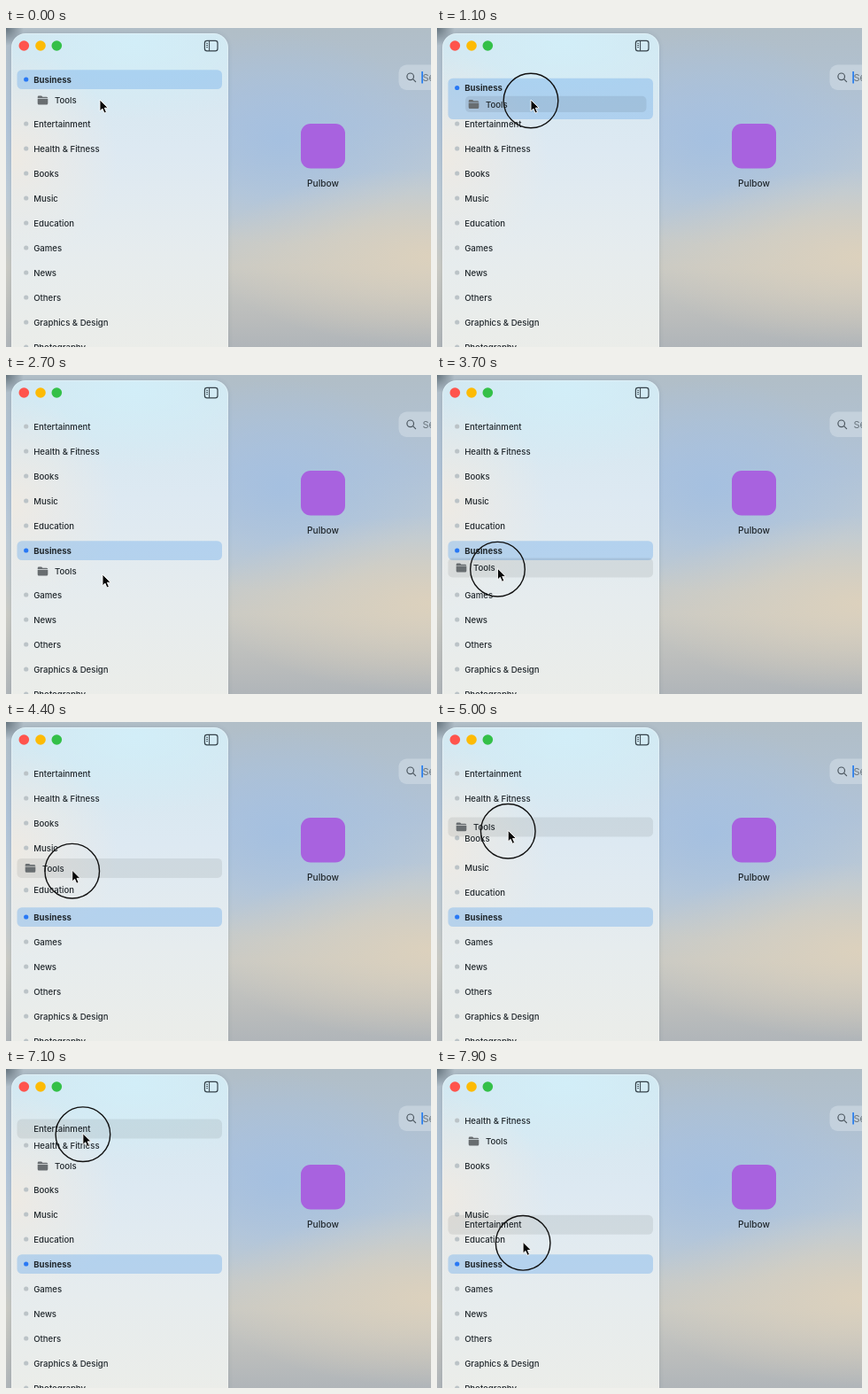
Recreate the animation shown at these times as an HTML page. Size 480 by 360 pixels, loop 8000 ms.

```html
<!DOCTYPE html>
<html lang="en">
<head>
<meta charset="utf-8">
<title>Sidebar reordering</title>
<style>
html, body { margin: 0; width: 100%; height: 100%; overflow: hidden; }
#stage {
  position: relative; width: 480px; height: 360px; overflow: hidden;
  background:
    radial-gradient(circle at 0 0, #55646ed0 0, #55646e00 20px),
    radial-gradient(ellipse 250px 100px at 480px 258px, #dcd1bd 0, #dcd1bd00 100%),
    radial-gradient(ellipse 170px 120px at 310px 125px, #a5c0e0 0, #a5c0e000 100%),
    linear-gradient(#b1bec7 0, #b0c3d8 30%, #bccad6 52%, #cacac4 75%, #bbbdbc 90%, #b0b5b9 100%);
}
#panel {
  position: absolute; left: 6px; top: 6px; width: 245px; height: 380px;
  border-radius: 16px;
  box-shadow: 0 0 5px #3c506428, inset 0 0 1px 1px #ffffff50;
  background:
    radial-gradient(ellipse 120px 120px at 0 140px, #eeeae3 0, #eeeae300 100%),
    radial-gradient(ellipse 170px 90px at 140px 10px, #d2eef8 0, #d2eef800 100%),
    linear-gradient(#d2e7f0 0, #dde9f2 35%, #e6ecee 65%, #ecede8 100%);
}
svg { position: absolute; left: 0; top: 0; }
text { font: 500 9.6px Inter, "Open Sans", sans-serif; fill: #20272c; }
</style>
</head>
<body>
<div id="stage">
  <div id="panel"></div>
  <svg width="480" height="360" viewBox="0 0 480 360">
    <circle cx="20.3" cy="20" r="5.8" fill="#ff544d"/>
    <circle cx="39" cy="20" r="5.8" fill="#fdbb05"/>
    <circle cx="57.3" cy="20" r="5.8" fill="#34c048"/>
    <g fill="none" stroke="#35424a" stroke-width="1.2">
      <rect x="224.4" y="14.4" width="14.6" height="11.4" rx="2.6"/>
      <path d="M229.6 14.4V25.8M226.2 17.3h1.8M226.2 19.5h1.8M226.2 21.7h1.8" stroke-width="1"/>
    </g>
    <rect x="443.5" y="41.5" width="60" height="28.5" rx="9" fill="#d0dce6" fill-opacity=".62"/>
    <g fill="none" stroke="#4b565f" stroke-width="1.2" stroke-linecap="round">
      <circle cx="456.7" cy="54.8" r="3.8"/><path d="M459.6 57.7l3 3"/>
    </g>
    <text x="470.5" y="59.9" style="font-size:11px;font-weight:400;fill:#69747d">Search</text>
    <rect id="caret" x="469.3" y="49" width="1.6" height="13.5" fill="#1f78f0"/>
    <rect x="333" y="108" width="50" height="50.5" rx="11" fill="#a862df"/>
    <text x="358" y="179" text-anchor="middle" style="font-size:10.2px">Pulbow</text>
    <g id="rows"></g>
    <circle id="ring" r="30.8" fill="none" stroke="#111" stroke-width="1.4"/>
    <path id="pointer" d="M0 0V12.8L2.9 10.1L5 15L7.4 14L5.3 9.2H9.2Z" fill="#080808" stroke="#fff" stroke-width=".9" stroke-linejoin="round"/>
  </svg>
</div>
<script>
const LOOP = 8000, STEP = 100;
const FIRST = 58, ROW = 28, CHILD = 22, CHILD_DROP = 23.5;
const $ = id => document.getElementById(id);

const names = ["Business", "Entertainment", "Health & Fitness", "Books", "Music", "Education",
  "Games", "News", "Others", "Graphics & Design", "Photography"];

// Each drag puts its item after another row; reach is the offset of the edge that pushes rows.
const drags = [
  { item: "Business", after: "Education", start: 1130, end: 1700, drop: 2150,
    y: [67.5, 214], reach: 13, grab: [106, 81], release: [109, 225] },
  { item: "Tools", after: "Health & Fitness", start: 3500, end: 5260, drop: 5300,
    y: [221.5, 112], reach: -12, grab: [68, 222], release: [81, 116] },
  { item: "Entertainment", after: "Music", start: 6900, end: 8100, drop: 8200,
    y: [58, 185], reach: -12, grab: [86, 62], release: [98, 206] },
];

const clamp = u => Math.min(1, Math.max(0, u));
const smooth = u => (u = clamp(u), u * u * (3 - 2 * u));
const unsmooth = p => .5 - Math.sin(Math.asin(1 - 2 * clamp(p)) / 3);
const easeOut = u => 1 - (1 - clamp(u)) ** 3;
const mix = (a, b, u) => a + (b - a) * u;

function slots({ order, owner }) {
  let y = FIRST;
  const result = {};
  for (const name of order) {
    result[name] = y;
    y += ROW + (name === owner ? CHILD : 0);
  }
  return result;
}

function applyDrag({ order, owner }, { item, after }) {
  if (item === "Tools") return { order, owner: after };
  const next = order.filter(name => name !== item);
  next.splice(next.indexOf(after) + 1, 0, item);
  return { order: next, owner };
}

let state = { order: names, owner: "Business" };
for (const drag of drags) {
  drag.before = slots(state);
  state = applyDrag(state, drag);
  drag.later = slots(state);
}

const progress = (drag, t) => smooth((t - drag.start) / (drag.end - drag.start));
const lift = (drag, t) => smooth((t - drag.start + 150) / 120) * (1 - easeOut((t - drag.drop) / 250));
const dragY = (drag, t) => mix(...drag.y, progress(drag, t));

// A row makes way once the dragged edge passes its centre.
function yielded(drag, name, t) {
  if (name === drag.item) return t >= drag.drop ? 1 : 0;
  const [from, to] = drag.y;
  const crossing = unsmooth((drag.before[name] - drag.reach - from) / (to - from));
  return easeOut((t - mix(drag.start, drag.end, crossing)) / 350);
}

function rowY(name, t) {
  let y = drags[0].before[name];
  for (const drag of drags) {
    y += (drag.later[name] - drag.before[name]) * yielded(drag, name, t);
    if (name === drag.item) y = mix(y, dragY(drag, t), lift(drag, t));
  }
  return y;
}

function pointerAt(t) {
  let point = drags[0].grab;
  for (const drag of drags) {
    const blend = (to, u) => point.map((v, i) => mix(v, to[i], u));
    point = blend(drag.grab, smooth((t - drag.start + 650) / 500));
    point = blend(drag.release, progress(drag, t));
  }
  return point;
}

function make(parent, tag, attrs, content) {
  const node = document.createElementNS("http://www.w3.org/2000/svg", tag);
  set(node, attrs);
  if (content) node.textContent = content;
  return parent.appendChild(node);
}
function set(node, attrs) {
  for (const key in attrs) node.setAttribute(key, attrs[key]);
}
const place = (node, x, y) => set(node, { transform: `translate(${x} ${y})` });

const rows = {};
function addRow(name) {
  const selected = name === "Business";
  const g = make($("rows"), "g", {});
  const box = make(g, "rect", { x: 12.5, y: -10.8, width: 231.5, height: 22, rx: 5.5,
    fill: selected ? "#72aeea" : "#000", "fill-opacity": selected ? .42 : .075 });
  const dot = make(g, "circle", { cx: 22.7, r: 2.6, fill: selected ? "#2878f5" : "#bbc3c7" });
  const label = make(g, "text", { x: 31.2, y: 3.7 }, name);
  if (selected) label.style.fontWeight = 650;
  rows[name] = { g, box, dot };
}
names.forEach(addRow);
for (const name of ["Business", "Entertainment"]) $("rows").append(rows[name].g);

const tools = make($("rows"), "g", {});
const toolsBox = make(tools, "rect", { fill: "#000", "fill-opacity": .075, rx: 5 });
const toolsItem = make(tools, "g", {});
make(toolsItem, "path", { fill: "#686d70",
  d: "M-19.3 -2.2V-3.6q0-1.4 1.4-1.4h3l1.3 1.2h4.5q1.4 0 1.4 1.6ZM-19.3 -1.5H-7.7V3.4q0 1.5-1.5 1.5h-8.6q-1.5 0-1.5-1.5Z" });
make(toolsItem, "text", { y: 3.7 }, "Tools");

function render(t) {
  const [groupLift, toolLift, rowLift] = drags.map(drag => lift(drag, t));
  for (const name of names) {
    place(rows[name].g, 0, rowY(name, t));
    if (name !== "Business") set(rows[name].box, { opacity: name === "Entertainment" ? rowLift : 0 });
  }
  set(rows["Business"].box, { height: 21.8 + 24.5 * groupLift });
  set(rows["Entertainment"].dot, { opacity: 1 - rowLift });

  const toolDrag = drags[1];
  const owner = t < toolDrag.drop ? "Business" : toolDrag.after;
  const restY = rowY(owner, t) + CHILD_DROP - 5 * groupLift;
  place(tools, 0, mix(restY, dragY(toolDrag, t), toolLift));
  place(toolsItem, 55 - 14 * toolLift, 0);
  set(toolsBox, toolLift > 0
    ? { x: 12.5, y: -11, width: 231.5, height: 22, opacity: toolLift }
    : { x: 32, y: -9.3, width: 204.5, height: 18.4, opacity: groupLift });

  const [x, y] = pointerAt(t);
  place($("pointer"), x, y);
  place($("ring"), x, y + 1);
  set($("ring"), { opacity: Math.max(groupLift, toolLift, rowLift) });
  set($("caret"), { opacity: (t + 100) % 1000 < 600 ? 1 : 0 });
}

const start = performance.now();
function tick() {
  const t = Math.max(0, performance.now() - start) % LOOP;
  render(Math.floor(t / STEP) * STEP);
  requestAnimationFrame(tick);
}
render(0);
requestAnimationFrame(tick);
</script>
</body>
</html>
```
